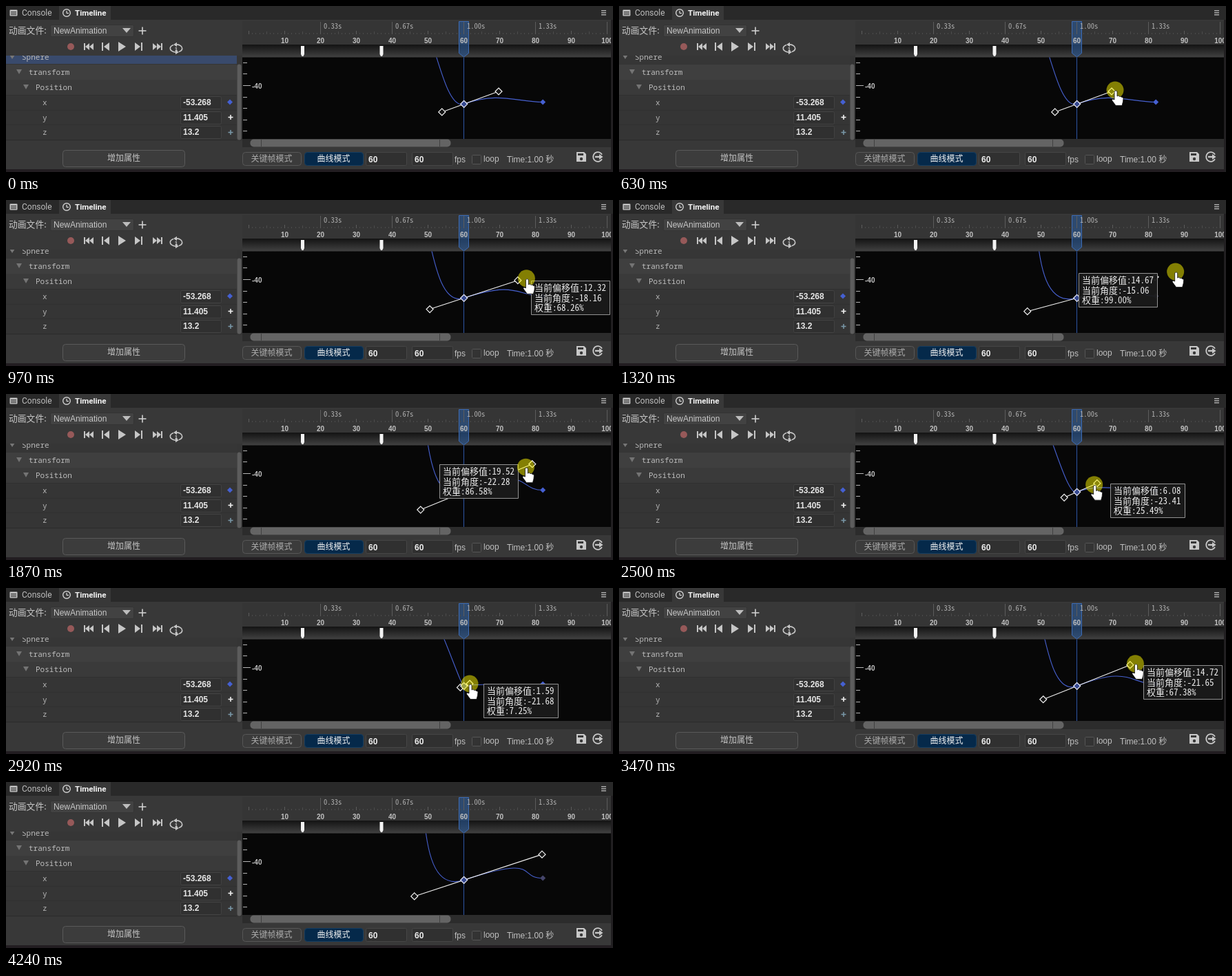
Write an HTML page with a canvas that moves like this. It is 881 px wide and 241 px high and loops after 4570 ms.

```html
<!DOCTYPE html>
<html lang="zh">
<head>
<meta charset="utf-8">
<style>
html, body { margin: 0; width: 100%; height: 100%; overflow: hidden; background: #383838; }
canvas { display: block; }
</style>
</head>
<body>
<canvas id="stage" width="881" height="241"></canvas>
<script>
const g = document.getElementById('stage').getContext('2d');
const LOOP = 4570, STEP = 69.4;
const UI = '"Liberation Sans", "Noto Sans CJK SC", "Noto Sans CJK", sans-serif';
const CJK = '"Noto Sans CJK SC", "Noto Sans CJK", sans-serif';
const MONO = '"Noto Sans Mono", monospace';
const TIP = '"Noto Sans Mono CJK SC", "Noto Sans CJK SC", monospace';

const KEY = { x: 664.7, y: 142.3 }, END = { x: 779.2, y: 139.5 }, PREV = { x: 592, y: 2 };
const SPAN = 114.44, LEFT_RATIO = 0.635;
const GRAB = 10, RELEASE = 58, GONE = 61;

// Pointer path: [step, x, y]
const PATH = [
  [2, 757, 166], [4, 733, 144], [6, 718, 134], [9, 718, 134], [10, 720, 122],
  [14, 742.82, 116.68], [16, 768, 111], [19, 801, 105.62], [22, 821, 101], [24, 806, 100],
  [27, 763.78, 101.71], [32, 717, 124], [36, 693.87, 129.67], [40, 677, 137.5], [42, 673, 139],
  [45, 673, 139], [50, 741.81, 111.69], [52, 757, 108], [54, 771, 106.5], [57, 771, 106.5],
  [58, 790, 101.2], [59, 800, 115], [61, 838, 225]
];

function pointer(n) {
  const i = PATH.findIndex(p => p[0] > n);
  if (i === 0) return { x: PATH[0][1], y: PATH[0][2] };
  const b = i < 0 ? PATH[PATH.length - 1] : PATH[i];
  const a = i < 0 ? b : PATH[i - 1];
  const k = a === b ? 0 : (n - a[0]) / (b[0] - a[0]);
  return { x: a[1] + (b[1] - a[1]) * k, y: a[2] + (b[2] - a[2]) * k };
}

function tangent(n) {
  if (n < GRAB) return { dx: 50.3, dy: 18.3, weight: 0.44 };
  const p = pointer(Math.min(n, RELEASE));
  const slope = (KEY.y - p.y) / (p.x - KEY.x);
  const weight = Math.min((p.x - KEY.x) / SPAN, 0.99);
  return { dx: weight * SPAN, dy: weight * SPAN * slope, weight };
}

function rect(x, y, w, h, fill) { g.fillStyle = fill; g.fillRect(x, y, w, h); }

function box(x, y, w, h, r, fill, stroke) {
  g.beginPath();
  g.roundRect(x + 0.5, y + 0.5, w - 1, h - 1, r);
  if (fill) { g.fillStyle = fill; g.fill(); }
  if (stroke) { g.strokeStyle = stroke; g.lineWidth = 1; g.stroke(); }
}

function text(s, x, y, font, color, align = 'left') {
  g.font = font;
  g.fillStyle = color;
  g.textAlign = align;
  g.textBaseline = 'alphabetic';
  g.fillText(s, x, y);
}

function poly(points, fill) {
  g.beginPath();
  for (const [x, y] of points) g.lineTo(x, y);
  g.closePath();
  g.fillStyle = fill;
  g.fill();
}

function line(x1, y1, x2, y2, color, width = 1) {
  g.beginPath();
  g.moveTo(x1, y1);
  g.lineTo(x2, y2);
  g.strokeStyle = color;
  g.lineWidth = width;
  g.stroke();
}

function circle(x, y, r, fill, stroke, width = 1.3) {
  g.beginPath();
  g.arc(x, y, r, 0, Math.PI * 2);
  if (fill) { g.fillStyle = fill; g.fill(); }
  if (stroke) { g.strokeStyle = stroke; g.lineWidth = width; g.stroke(); }
}

function diamond(x, y, r, fill, stroke) {
  poly([[x, y - r], [x + r, y], [x, y + r], [x - r, y]], fill);
  if (stroke) { g.strokeStyle = stroke; g.lineWidth = 1.2; g.stroke(); }
}

function plus(x, y, r, color, width = 1.6) {
  line(x - r, y, x + r, y, color, width);
  line(x, y - r, x, y + r, color, width);
}

// Triangle with its base at x, pointing along dir
function arrow(x, y, dir, w, h, color) {
  poly([[x, y - h], [x + dir * w, y], [x, y + h]], color);
}

function drawTabs() {
  rect(0, 0, 881, 20, '#292929');
  rect(77, 0, 75, 21, '#383838');
  box(5, 5, 12, 10, 1, '#c4c4c4');
  for (const y of [8, 10, 12]) rect(7, y, 8, 1, '#333');
  text('Console', 23, 14, '12px Roboto, ' + UI, '#bdbdbd');
  circle(88, 10, 5.3, null, '#d0d0d0', 1.4);
  line(88, 7, 88, 10.5, '#d0d0d0', 1.3);
  line(88, 10.5, 91, 10.5, '#d0d0d0', 1.3);
  text('Timeline', 100, 14, 'bold 11.6px Roboto, ' + UI, '#f2f2f2');
  for (const y of [6, 9, 12]) rect(864, y, 7, 1.5, '#a8a8a8');
}

function drawTransport() {
  const c = '#c6c6c6', y = 59;
  text('动画文件:', 4, 40, '12.8px ' + CJK, '#c8c8c8');
  box(64, 27, 122, 18, 2, '#424242', '#343434');
  text('NewAnimation', 69, 40, '12px ' + UI, '#c9c9c9');
  poly([[169, 32], [181, 32], [175, 39]], '#bdbdbd');
  plus(198, 36, 5.5, '#d0d0d0', 1.6);
  circle(94, y, 5, '#965959');
  rect(113, y - 5, 2, 10, c);
  arrow(121, y, -1, 6, 5, c);
  arrow(127, y, -1, 6, 5, c);
  rect(139, y - 6, 2, 12, c);
  arrow(150, y, -1, 8, 6, c);
  arrow(163, y, 1, 11, 7, c);
  arrow(187, y, 1, 8, 6, c);
  rect(196, y - 6, 2, 12, c);
  arrow(213, y, 1, 6, 5, c);
  arrow(219, y, 1, 6, 5, c);
  rect(225, y - 5, 2, 10, c);
  for (const from of [-1.5, 1.64]) {
    g.beginPath();
    g.ellipse(247, 61.5, 8.7, 5.6, 0, from, from + 2.6);
    g.strokeStyle = c;
    g.lineWidth = 1.7;
    g.stroke();
  }
  arrow(248, 56, -1, 5, 3.3, c);
  arrow(246, 67, 1, 5, 3.3, c);
  text('1', 247, 64.5, 'bold 8px ' + UI, c, 'center');
}

function drawTree(selected) {
  g.save();
  g.beginPath();
  g.rect(0, 72, 343, 124);
  g.clip();
  rect(0, 72, 343, 124, '#353535');
  rect(0, 72, 335, 12, selected ? '#394a6c' : '#363636');
  rect(0, 85, 335, 22, '#3f3f3f');
  rect(0, 107, 335, 22, '#3a3a3a');
  poly([[5, 71], [13, 71], [9, 77]], '#777');
  text('Sphere', 23, 78, '11px ' + MONO, '#b8b8b8');
  poly([[15, 92], [23, 92], [19, 99]], '#747474');
  text('transform', 33, 100, '11px ' + MONO, '#bdbdbd');
  poly([[25, 114], [33, 114], [29, 121]], '#747474');
  text('Position', 43, 122, '11px ' + MONO, '#bdbdbd');
  [['x', '-53.268'], ['y', '11.405'], ['z', '13.2']].forEach(([name, value], i) => {
    const y = 129 + Math.round(i * 21.7);
    rect(0, y, 335, 1, '#303030');
    text(name, 53, y + 15, '11px ' + MONO, '#b5b5b5');
    box(253, y + 2, 60, 19, 2, '#303030', '#424242');
    text(value, 257, y + 15, 'bold 12px ' + UI, '#e6e6e6');
  });
  diamond(325, 139.5, 4, '#4560d2');
  plus(326, 161.5, 3.5, '#f0f0f0');
  plus(326, 183.5, 3.5, '#7896a6');
  rect(0, 194, 335, 1, '#2c2c2c');
  box(335, 84, 7, 111, 3, '#5c5c5c');
  g.restore();
}

function drawPlayhead() {
  poly([[657.5, 22.5], [671.5, 22.5], [671.5, 68.5], [664.5, 74], [657.5, 68.5]], 'rgba(42,88,150,.6)');
  g.strokeStyle = '#3d6cb5';
  g.lineWidth = 1;
  g.stroke();
}

function drawRuler() {
  rect(343, 22, 535, 34, '#353535');
  const shade = g.createLinearGradient(0, 56, 0, 74);
  shade.addColorStop(0, '#131313');
  shade.addColorStop(1, '#404040');
  rect(343, 56, 535, 19, shade);
  for (const x of [430.5, 545]) {
    poly([[x - 2.5, 58], [x + 2.5, 58], [x + 2.5, 70], [x + 1, 73], [x - 1, 73], [x - 2.5, 70]], '#f4f4f4');
  }
  drawPlayhead();
  for (let f = 0; f <= 100; f++) {
    const x = Math.round(353 + f * 5.2) - 0.5;
    const tall = f && f % 20 === 0;
    const top = tall ? 23 : f % 10 === 0 ? 36 : f % 5 === 0 ? 37 : 39;
    line(x, top, x, 41, f % 10 ? '#4c4c4c' : '#5c5c5c');
    if (f && f % 10 === 0) text(String(f), x, 54, 'bold 10px ' + UI, '#c2c2c2', 'center');
    if (tall && f < 100) text((f / 60).toFixed(2) + 's', x + 4.5, 33, '500 10.5px ' + TIP, '#b4b4b4');
  }
}

function drawGraph(t) {
  const right = { x: KEY.x + t.dx, y: KEY.y - t.dy };
  const left = { x: KEY.x - t.dx * LEFT_RATIO, y: KEY.y + t.dy * LEFT_RATIO };
  g.save();
  g.beginPath();
  g.rect(343, 74.5, 535, 118.5);
  g.clip();
  rect(343, 74, 535, 119, '#070707');
  for (let i = -2; i <= 4; i++) {
    const y = Math.round(115 + i * 16.6) + 0.5;
    line(344, y, i ? 350 : 355, y, '#b5b5b5');
  }
  text('-40', 357, 119.5, 'bold 10px ' + UI, '#c4c4c4');
  line(664.5, 74, 664.5, 193, '#2d55a5');

  g.beginPath();
  g.moveTo(PREV.x, PREV.y);
  g.bezierCurveTo(PREV.x + 24.2, PREV.y, left.x, left.y, KEY.x, KEY.y);
  g.bezierCurveTo(right.x, right.y, END.x - 38.1, END.y, END.x, END.y);
  g.strokeStyle = '#4660cf';
  g.lineWidth = 1.1;
  g.stroke();
  diamond(END.x, END.y, 4, t.weight >= 0.99 ? '#45456a' : '#4560d2');

  line(left.x, left.y, right.x, right.y, '#f0f0f0', 1.1);
  diamond(left.x, left.y, 5, '#151515', '#f2f2f2');
  diamond(right.x, right.y, 5, '#151515', '#f2f2f2');
  diamond(KEY.x, KEY.y, 5, '#35488f', '#eef0ff');
  g.restore();
}

function drawFooter() {
  rect(343, 193, 535, 12, '#2c2c2c');
  box(354, 193, 292, 12, 5, '#646464');
  line(370.5, 194, 370.5, 204, '#404040');
  line(629.5, 194, 629.5, 204, '#404040');
  const label = '12px ' + CJK, plain = '12px ' + UI;
  box(82, 209, 178, 25, 4, '#3c3c3c', '#5a5a5a');
  text('增加属性', 171, 225, label, '#c4c4c4', 'center');
  box(343, 212, 86, 20, 4, '#3b3b3b', '#575757');
  text('关键帧模式', 385.5, 226, label, '#adadad', 'center');
  box(433, 212, 86, 20, 4, '#05294a', '#153d60');
  text('曲线模式', 475.5, 226, '500 ' + label, '#f4f4f4', 'center');
  for (const x of [522, 589]) {
    box(x, 212, 60, 20, 2, '#303030', '#464646');
    text('60', x + 4, 227, 'bold 12px ' + UI, '#ececec');
  }
  text('fps', 651, 227, plain, '#c0c0c0');
  box(676, 216, 14, 14, 1, '#333', '#555');
  text('loop', 693, 226, plain, '#c0c0c0');
  text('Time:1.00 秒', 727, 227, plain, '#c0c0c0');

  poly([[828, 212], [839, 212], [842, 215], [842, 226], [828, 226]], '#c8c8c8');
  rect(830, 214, 8, 3, '#383838');
  circle(835, 222, 2.2, '#383838');
  g.beginPath();
  g.arc(859, 219, 6.8, 0.5, 5.78);
  g.strokeStyle = '#c8c8c8';
  g.lineWidth = 1.8;
  g.stroke();
  line(855, 219, 862, 219, '#c8c8c8', 2.4);
  arrow(861, 219, 1, 5.5, 4, '#c8c8c8');
  rect(0, 237, 881, 4, '#221d21');
  rect(878, 20, 3, 221, '#211f21');
}

function drawTooltip(p, t) {
  const font = '500 13px ' + TIP;
  const rows = [
    '当前偏移值:' + (t.dy * 0.481).toFixed(2),
    '当前角度:' + (-Math.atan2(t.dy, t.dx) * 180 / Math.PI).toFixed(2),
    '权重:' + (t.weight * 100).toFixed(2) + '%'
  ];
  g.font = font;
  const w = Math.round(Math.max(...rows.map(s => g.measureText(s).width)) + 10);
  const y = Math.round(p.y);
  const x = Math.floor(p.x + 20 + w > 878 ? p.x - 20 - w : p.x + 20);
  box(x, y, w + 1, 50, 0, 'rgba(27,27,27,.94)', '#929292');
  rows.forEach((s, i) => text(s, x + 5, y + 15 + i * 14.6, font, '#ececec'));
}

function drawCursor({ x, y }) {
  circle(x, y, 12.5, 'rgba(255,248,0,.5)');
  g.save();
  g.translate(x + 1, y + 1);
  g.beginPath();
  g.moveTo(-2, 1);
  g.quadraticCurveTo(0, -1.5, 2, 1);
  g.lineTo(2, 8);
  g.quadraticCurveTo(4, 6, 5.5, 8.5);
  g.quadraticCurveTo(7.5, 7.5, 8.5, 9.5);
  g.quadraticCurveTo(10.5, 9, 11, 11);
  g.lineTo(10.5, 16);
  g.lineTo(9, 21.5);
  g.lineTo(0, 21.5);
  g.lineTo(-5.5, 14);
  g.quadraticCurveTo(-6, 11, -2, 13);
  g.closePath();
  g.fillStyle = '#fff';
  g.fill();
  g.strokeStyle = '#111';
  g.lineWidth = 0.8;
  g.stroke();
  g.restore();
}

function render(ms) {
  const n = Math.floor((ms + 8) / STEP);
  const t = tangent(n);
  rect(0, 0, 881, 241, '#383838');
  drawTabs();
  drawTransport();
  drawTree(n < 9);
  drawRuler();
  drawGraph(t);
  drawFooter();
  if (n >= GRAB && n <= RELEASE) drawTooltip(pointer(n), t);
  // The drawn cursor runs one step ahead of the dragged handle
  if (n >= 1 && n < GONE) drawCursor(pointer(n + 1));
}

const start = performance.now();
function tick() {
  render((performance.now() - start) % LOOP);
  requestAnimationFrame(tick);
}
tick();
</script>
</body>
</html>
```
